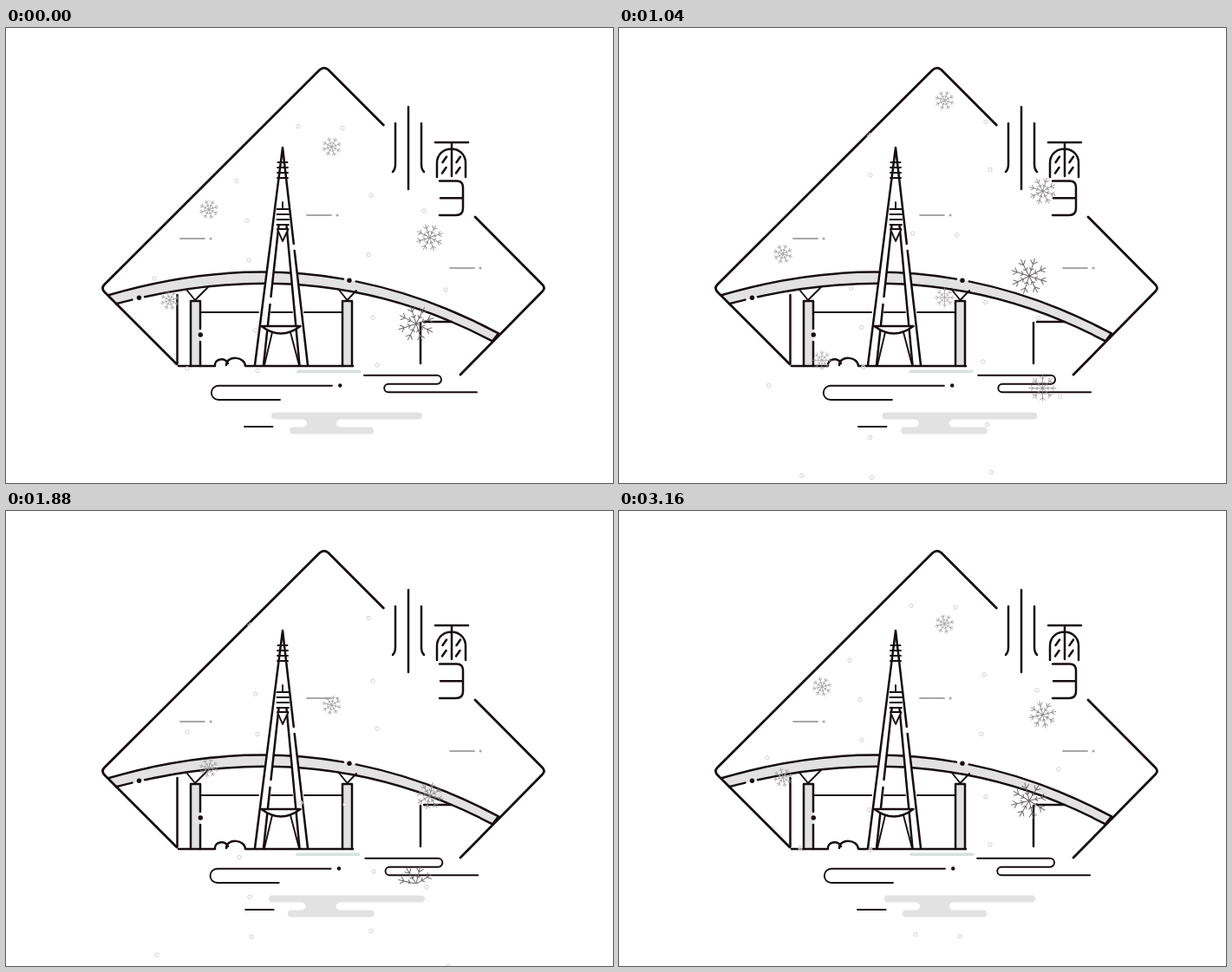
An HTML page for the animation above (3200 ms loop, 700x525 px).

```html
<!DOCTYPE html>
<html lang="zh">
<head>
<meta charset="utf-8">
<title>小雪</title>
<style>
  html, body { margin: 0; width: 100%; height: 100%; overflow: hidden; background: #fff; }
  svg { display: block; width: 700px; height: 525px; }
  .ink { fill: none; stroke: #170d10; stroke-width: 2.5; stroke-linecap: round; stroke-linejoin: round; }
  .bold { stroke-width: 2.8; }
  .thin { stroke-width: 1.9; }
  .dot { fill: #170d10; stroke: none; }
  .grey { fill: #e2e2e2; }
  .white { fill: #fff; }
  .wind { fill: none; stroke: #a8a8a8; stroke-width: 1.8; stroke-linecap: round; }
  .wind .end { stroke-width: 3; }
  .flake { fill: none; stroke-linecap: round; }
  .drop { fill: #fff; fill-opacity: .5; stroke: #d2d2d2; stroke-width: 1; }
</style>
</head>
<body>
<svg viewBox="0 0 700 525">
  <defs>
    <clipPath id="diamond"><path d="M366.5 43.5L623 300L493 430H240L110 300Z"/></clipPath>
    <clipPath id="roof"><path d="M366.5 43.5L623 300V525H110V300Z"/></clipPath>
  </defs>

  <g class="wind">
    <path d="M201 243H229M347 216H375M512 277H540"/>
    <path class="end" d="M236 243h.1M382 216h.1M547 277h.1"/>
  </g>

  <!-- bridge -->
  <g transform="translate(0 -.7)">
    <path class="grey" d="M118 309C270 264 420 274 568 353L561 362C415 285 270 281 127 319Z"/>
    <g class="ink">
      <path d="M118 309C270 264 420 274 568 353L561 362" stroke-dasharray="274 15 500"/>
      <path d="M127 319C270 281 415 285 561 362" stroke-dasharray="19 15 500"/>
      <circle class="dot" cx="153.500" cy="312" r="2.7"/>
      <circle class="dot" cx="396" cy="292" r="2.7"/>
    </g>
  </g>

  <!-- pillars -->
  <path class="grey" d="M213 315H224V390H213ZM388 315H399V390H388Z"/>
  <g class="ink">
    <path d="M224 347V315H213V390M224 362V390M388 390V315H399V390"/>
    <path class="thin" d="M209 303L218 314L233 299M383 301L393.500 314L404 303"/>
    <path class="thin" d="M225 328H291M306 328H330M344 328H387"/>
    <circle class="dot" cx="224.300" cy="354" r="2.7"/>
  </g>

  <!-- tower -->
  <path class="white" d="M319 138L287 389H297L314.500 228H323.500L338 389H348Z"/>
  <g class="ink">
    <path d="M319 138L287 389M319 138L331.800 249M332.700 257L348 389"/>
    <path d="M314.500 228L305.500 310M304.500 319L297 389M323.500 228L338.500 389"/>
    <path class="thin" d="M313.500 155H324.500M313 161H325M313 167H325M313 173H325"/>
    <path class="thin" d="M319 201V209M312.500 209H326M312.500 215H326M312.500 221H326M312.500 227H326"/>
    <path class="white thin" d="M313 232H325.500L319 246Z"/>
    <path class="white" d="M294.500 344H339.500Q317 361 294.500 344Z"/>
    <path class="thin" d="M307 351L298 389M328 351L338 389"/>
  </g>

  <!-- ground and frame -->
  <g class="ink">
    <path d="M199 390H241C240 382 252 379 256 387M254 389C254 378 275 378 276 390H400"/>
    <path d="M197.500 308V387M482 339H514M478 340V387"/>
    <path class="bold" d="M435.300 112L371.500 48Q366.500 44 361.500 48.500L113.500 296Q109.500 300 113.500 304.500L197 388"/>
    <path class="bold" d="M541 218L618.500 296Q622.500 300 618.500 304L524 400"/>
  </g>

  <!-- lettering -->
  <g class="ink">
    <path d="M464 91V186M449 110V157Q449 163 446 166M479 110V157Q479 163 482 166"/>
    <path d="M495 132H533M514 132V171M497 172V156C497 134 530 134 530 156V172"/>
    <path d="M503.500 155L508 148.500M503 167.500L507.500 161M519.500 155L524 148.500M519 167.500L523.500 161"/>
    <path d="M500 176.500H520Q527 176.500 527 184V208Q527 216 519 216H500M501 196.300H527"/>
  </g>

  <!-- water -->
  <path class="sway" data-dx="-1.7" d="M337 396.300H408" stroke="#d8e1de" stroke-width="3.6" stroke-linecap="round"/>
  <g class="ink thin sway" data-dx="-1.7">
    <path d="M316 429H245A8 8 0 0 1 245 412.700H376"/>
    <circle class="dot" cx="385.300" cy="412.500" r="2.2"/>
  </g>
  <path class="ink thin sway" data-dx="1.7" d="M413 400.700H497A5 5 0 0 1 497 410.700H441A4.800 4.800 0 0 0 441 420.300H543"/>
  <path class="ink thin sway" data-dx="1.5" d="M275 460H307.500"/>
  <path id="pool" class="grey" d="M310 443.500H476A4 4 0 0 1 476 451.500H386Q381 452 381 456T386 460.500H420A4 4 0 0 1 420 468.500H331A4 4 0 0 1 331 460.500H342Q347 460 347 456T342 451.500H310A4 4 0 0 1 310 443.500Z"/>

  <g id="drops" clip-path="url(#roof)"></g>
  <g id="flakes" clip-path="url(#diamond)"></g>
</svg>
<script>
const LOOP = 3200, STEP = 40;
const $ = id => document.getElementById(id);

function add(parent, tag, attrs) {
  const el = document.createElementNS('http://www.w3.org/2000/svg', tag);
  for (const k in attrs) el.setAttribute(k, attrs[k]);
  return parent.appendChild(el);
}

// One arm with two pairs of side branches, repeated around the centre.
function flakePath(r, arms) {
  let d = '';
  for (let i = 0; i < arms; i++) {
    const a = i * 2 * Math.PI / arms;
    const at = (u, v) => [u * Math.cos(a) - v * Math.sin(a), u * Math.sin(a) + v * Math.cos(a)]
      .map(n => (n * r).toFixed(2)).join(' ');
    d += `M0 0L${at(1, 0)}`;
    for (const [u, w] of [[.34, .12], [.68, .19]])
      d += `M${at(u + w, w)}L${at(u, 0)}L${at(u + w, -w)}`;
  }
  return d;
}

// x, y at age zero, radius, colour, line width, speed
const flakes = [
  [375.5, 130.3, 11, '#a19fa1', .75, .1673],
  [234, 202.7, 11, '#a19fa1', .75, .1673],
  [488.5, 235, 15.5, '#858284', .8, .1673],
  [473, 334.3, 21, '#6c686a', 1, .1715],
  [189, 307.5, 11, '#a19fa1', .75, .1673]
].flatMap(([x, y, r, stroke, width, v]) => [1320, 3160].map(start => ({
  x, y, start, v,
  el: add($('flakes'), 'path', { class: 'flake', d: flakePath(r, 8), stroke, 'stroke-width': width })
})));

const drops = [
  [337, 113.5], [388, 115.5], [266, 176.5], [278, 222], [421, 193],
  [482, 211], [280, 268], [418, 261.500], [171, 289], [507, 302],
  [423, 334], [288, 349], [428, 389], [209, 393], [290, 395.5]
].flatMap(([x, y]) => [0, LOOP].map(start => ({
  x, y, start, el: add($('drops'), 'circle', { class: 'drop', r: 2.2 })
})));

const sways = [...document.querySelectorAll('.sway')];

function draw(t) {
  for (const f of flakes) {
    // Each fall spans from 1500 ms before its anchor to 1700 ms after it.
    const age = (t - f.start + 1500 + 2 * LOOP) % LOOP - 1500;
    const turn = -360 * (age + 520) / LOOP;
    f.el.setAttribute('transform', `translate(${f.x} ${f.y + f.v * age}) rotate(${turn})`);
  }
  for (const p of drops) {
    const age = t - p.start;
    p.el.setAttribute('cx', p.x + (age > 0 ? .0016 * age : 0));
    p.el.setAttribute('cy', p.y + (age > 0 ? .1187 : .1045) * age);
  }
  const s = (1 - Math.cos(2 * Math.PI * t / 800)) / 2;
  for (const el of sways) el.setAttribute('transform', `translate(${el.dataset.dx * s} 0)`);
  $('pool').setAttribute('transform', `translate(393 0) scale(${1 + .042 * s} 1) translate(-393 0)`);
}

const begin = performance.now();
function tick() {
  const t = (performance.now() - begin) % LOOP;
  draw(Math.floor(t / STEP) * STEP);
  requestAnimationFrame(tick);
}
tick();
</script>
</body>
</html>
```
